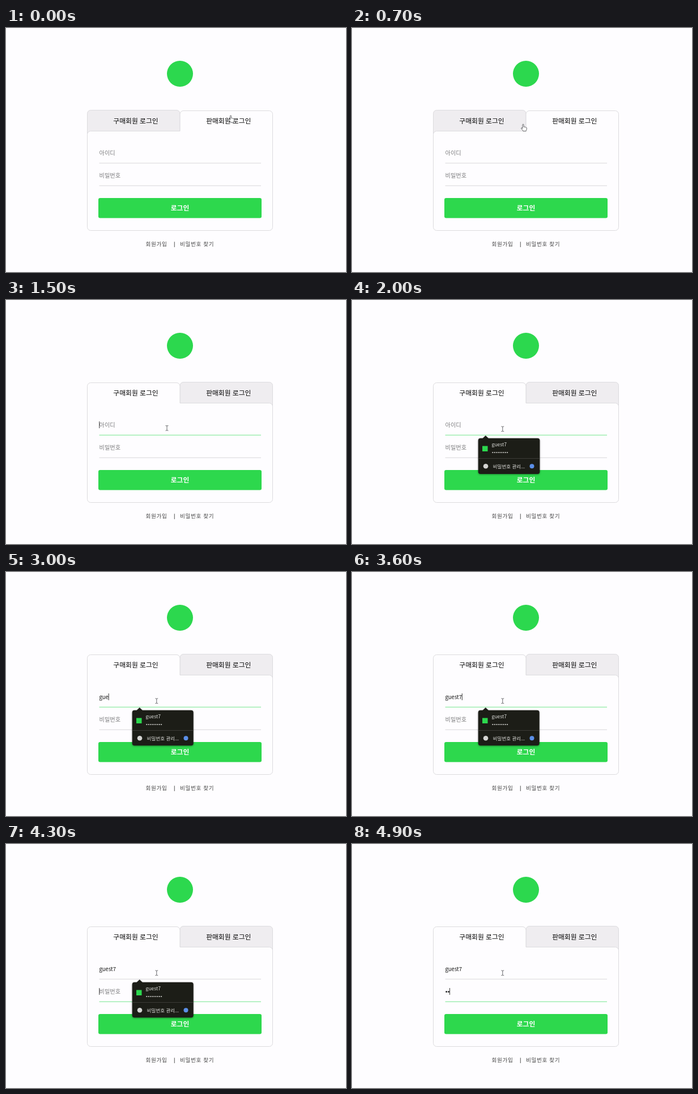
These frames come from a looping animation (600 px wide and 432 px high, 5 s). An HTML page:

```html
<!DOCTYPE html>
<html lang="ko">
<head>
<meta charset="utf-8">
<title>로그인</title>
<style>
  html, body { margin: 0; width: 100%; height: 100%; overflow: hidden; background: #fefdff; }
  svg { display: block; width: 600px; height: 432px; }
  text { font-family: "Noto Sans CJK KR", "Noto Sans CJK JP", "Noto Sans CJK", "Noto Sans", sans-serif; white-space: pre; }
  .tab { font-size: 11.8px; text-anchor: middle; fill: #000; }
  .hint { font-size: 10.2px; fill: #7b7b7d; }
  .typed { font-size: 9.5px; fill: #151515; }
  .link { font-size: 9.6px; letter-spacing: .65px; fill: #444; }
  .edge { stroke: #dcdbde; }
  .line { stroke: #d8d7d9; }
  .line.on { stroke: #72e68c; }
  .popup text { font-size: 8.5px; fill: #dededb; }
  .pointer { stroke: #55565a; stroke-width: .9; stroke-linejoin: round; stroke-linecap: round; }
</style>
</head>
<body>
<svg viewBox="0 0 600 432">
  <rect width="600" height="432" fill="#fefdff"/>
  <circle cx="307" cy="81" r="23" fill="#2cd84e"/>

  <g id="card" class="edge">
    <rect x="143.5" y="145.5" width="163.5" height="60" rx="6" fill="#efedf0"/>
    <path fill="#fefdff" d="M307 182.5H149.5a6 6 0 0 0-6 6V352.5a6 6 0 0 0 6 6H464.5a6 6 0 0 0 6-6V152.5a6 6 0 0 0-6-6H313a6 6 0 0 0-6 6Z"/>
  </g>
  <text class="tab" x="229" y="169">구매회원 로그인</text>
  <text class="tab" x="392.8" y="169">판매회원 로그인</text>

  <text class="hint" id="idHint" x="164.6" y="225">아이디</text>
  <text class="hint" id="pwHint" x="164.6" y="265">비밀번호</text>
  <text class="typed" id="idText" x="164.5" y="225"></text>
  <g id="pwDots" fill="#151515"></g>
  <path class="line" id="idLine" d="M164.5 239.2H450"/>
  <path class="line" id="pwLine" d="M164.5 279.2H450"/>
  <path id="caret" stroke="#222" stroke-width=".9" d="M0 -6V6"/>

  <rect x="163" y="301" width="288" height="35.5" rx="3" fill="#2dd84d"/>
  <text x="307" y="323.3" font-size="11.8" font-weight="700" text-anchor="middle" fill="#fff">로그인</text>
  <text class="link" x="246.6" y="386">회원가입</text>
  <path d="M297.3 378.5V388" stroke="#555"/>
  <text class="link" x="307" y="386">비밀번호 찾기</text>

  <g id="popup" class="popup">
    <g style="filter: drop-shadow(0 1px 1.5px rgba(0,0,0,.4))" fill="#1c1d17">
      <path d="M229.5 246L235.7 240L242 246Z"/>
      <rect id="popupBox" x="222.7" y="244.7" width="108" height="62.5" rx="4"/>
    </g>
    <path d="M222.7 280.5H330.5" stroke="#44453f" stroke-width=".8"/>
    <rect x="230" y="258.5" width="9.5" height="9.5" fill="#2cd84e"/>
    <text x="246.6" y="259.3">guest7</text>
    <g id="mask" fill="#dededb"></g>
    <circle cx="236" cy="294.3" r="4.3" fill="#d4d4d2"/>
    <text x="248.8" y="297.5">비밀번호 관리...</text>
    <circle cx="317.5" cy="294.3" r="4" fill="#5b8fe8"/>
  </g>

  <path id="hand" class="pointer" fill="#fff" d="M-1 7V1Q-1-.4 0-.4T1.1 1V4.6Q2.2 3.8 3 4.9Q4.2 4.3 4.8 5.5Q6.3 5.1 6.4 6.7Q6.4 9.5 5.2 11V12H-.1V11.3L-3.3 7.4Q-3.7 6 -2.4 6Z"/>
  <path id="beam" class="pointer" fill="none" d="M-2-4.4Q-.3-4.4 0-3.6Q.3-4.4 2-4.4M0-3.6V3.6M-2 4.4Q-.3 4.4 0 3.6Q.3 4.4 2 4.4"/>
</svg>
<script>
const LOOP = 5000, STEP = 100;
const SWITCH = 1100, FOCUS_ID = 1500, FOCUS_PW = 4100;
const POPUP = [1900, 4500];
const NAME = "guest7";
const nameKeys = [2700, 2900, 3000, 3200, 3400, 3600];
const passKeys = [4500, 4800];
const caretEvents = [FOCUS_ID, ...nameKeys, FOCUS_PW, ...passKeys];

// time, x, y
const path = [
  [0, 396.5, 155.2], [400, 396.5, 155.2], [500, 385, 157],
  [700, 302, 170.6], [1000, 262, 165], [1200, 264, 167],
  [1400, 282, 221], [1500, 284, 226.8], [1700, 284, 226.8],
  [1900, 265.8, 228.3], [LOOP, 265.8, 228.3]
];

const $ = id => document.getElementById(id);
const show = (id, on) => $(id).setAttribute("visibility", on ? "visible" : "hidden");
const place = (id, x, y) => $(id).setAttribute("transform", `translate(${x} ${y})`);
const count = (keys, t) => keys.filter(k => k <= t).length;
const dots = (n, x, y, gap, r) => Array.from({ length: n },
  (_, i) => `<circle cx="${x + i * gap}" cy="${y}" r="${r}"/>`).join("");

function pointerAt(t) {
  const i = path.findIndex(p => p[0] > t);
  const [t0, x0, y0] = path[i - 1], [t1, x1, y1] = path[i];
  const k = (t - t0) / (t1 - t0);
  return [x0 + (x1 - x0) * k, y0 + (y1 - y0) * k];
}

function draw(t) {
  // The card is mirrored when the other tab is chosen.
  $("card").setAttribute("transform", t >= SWITCH ? "translate(614 0) scale(-1 1)" : "");

  const onPw = t >= FOCUS_PW, onId = t >= FOCUS_ID && !onPw;
  $("idLine").classList.toggle("on", onId);
  $("pwLine").classList.toggle("on", onPw);

  const typed = count(nameKeys, t), secret = count(passKeys, t);
  $("idText").textContent = NAME.slice(0, typed);
  $("pwDots").innerHTML = dots(secret, 166.6, 261.7, 3.8, 1.4);
  show("idHint", !typed);
  show("pwHint", !secret);

  const last = caretEvents.filter(e => e <= t).pop();
  show("caret", last !== undefined && (t - last) % 1000 < 500);
  if (onPw) place("caret", 164.8 + secret * 3.85, 261);
  else place("caret", 164.8 + (typed ? $("idText").getComputedTextLength() : 0), 221);

  show("popup", t >= POPUP[0] && t < POPUP[1]);
  const fresh = t < POPUP[0] + 200;
  $("popupBox").setAttribute("width", fresh ? 108.7 : 108);
  $("popupBox").setAttribute("height", fresh ? 63.2 : 62.5);

  const [x, y] = pointerAt(t), overInput = t >= 1400;
  show("hand", !overInput);
  show("beam", overInput);
  place(overInput ? "beam" : "hand", x, y);
}

$("mask").innerHTML = dots(9, 248.2, 270, 3.25, 1);
const start = performance.now();
function tick() {
  const t = (performance.now() - start) % LOOP;
  draw(Math.floor(t / STEP) * STEP);
  requestAnimationFrame(tick);
}
tick();
</script>
</body>
</html>
```
